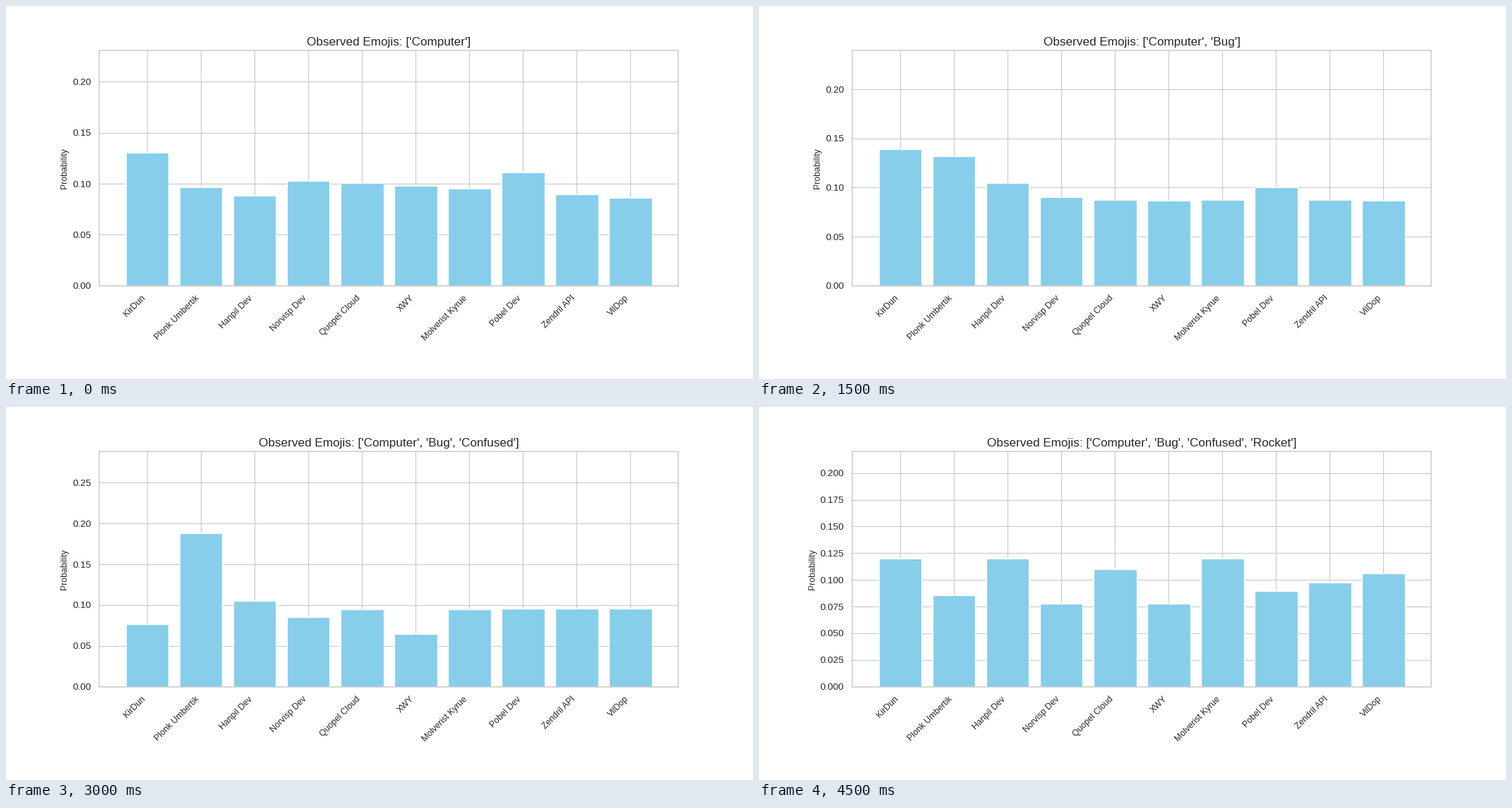
Write a matplotlib script that moves like this. It is 1058 by 529 pixels and loops after 6 s.

```python
import matplotlib.pyplot as plt
import numpy as np
from matplotlib.animation import FuncAnimation

WIDTH, HEIGHT = 1058, 529
INK, LINE = "0.15", "0.8"

plt.rcParams.update({
    "font.family": "Liberation Sans",
    "text.color": INK,
    "axes.labelcolor": INK,
    "axes.edgecolor": LINE,
    "axes.linewidth": 1.25,
    "axes.grid": True,
    "axes.axisbelow": True,
    "grid.color": LINE,
    "grid.linewidth": 1,
    "patch.edgecolor": "white",
    "patch.linewidth": 1,
    "patch.force_edgecolor": True,
    "xtick.bottom": False,
    "ytick.left": False,
    "xtick.major.size": 6,
    "ytick.major.size": 6,
    "xtick.color": INK,
    "ytick.color": INK,
    "xtick.labelsize": 10,
    "ytick.labelsize": 11,
})

SITES = ["KirDun", "Plonk Umbertik", "Hanpil Dev", "Norvisp Dev",
         "Quopel Cloud", "XWY", "Molverist Kyrue", "Pobel Dev",
         "Zendril API", "VilDop"]
EMOJIS = ["Computer", "Bug", "Confused", "Rocket"]
x = np.arange(len(SITES))


def bump(center, height, width=0.5):
    return height * np.exp(-((x - center) / width) ** 2)


def slope():
    """Gentle decline with a dip after the leading site."""
    return 0.1125 - 0.0029 * x + bump(0, 0.0183) + bump(1.6, -0.0235, 0.8) + bump(7, 0.019)


def shoulder():
    """Flat level with a wide rise on the left."""
    return 0.087 + bump(0.3, 0.0542, 1.6) + bump(7, 0.013)


def spike():
    """One dominant site, with a few weaker than the rest."""
    return 0.0955 + bump(1.1, 0.0953, 0.6) + bump(0, -0.022) + bump(3, -0.01) + bump(5, -0.031)


def zigzag():
    """Alternating high and low sites, fading out and flipping on the right."""
    swing = np.interp(x, [6, 8.5], [0.0208, -0.007])
    return 0.099 + swing * np.cos(np.pi * x) + bump(1, 0.0075) + bump(4, -0.01)


PROFILES = [slope, shoulder, spike, zigzag]

fig, ax = plt.subplots(figsize=(12, 6), dpi=WIDTH / 12)
fig.subplots_adjust(left=0.125, right=0.8998, bottom=0.25, top=0.88)


def update(step):
    probs = PROFILES[step]()
    ax.clear()
    ax.bar(x, probs, color="skyblue")
    ax.set_xticks(x, SITES, rotation=45, ha="right")
    ax.set_ylim(0, probs.max() + 0.1)
    ax.set_ylabel("Probability", fontsize=10)
    ax.set_title(f"Observed Emojis: {EMOJIS[:step + 1]}", fontsize=14)
    return []


anim = FuncAnimation(fig, update, frames=len(EMOJIS), init_func=lambda: update(0),
                     interval=1500, repeat=True, repeat_delay=0, blit=False)
plt.show()
```
